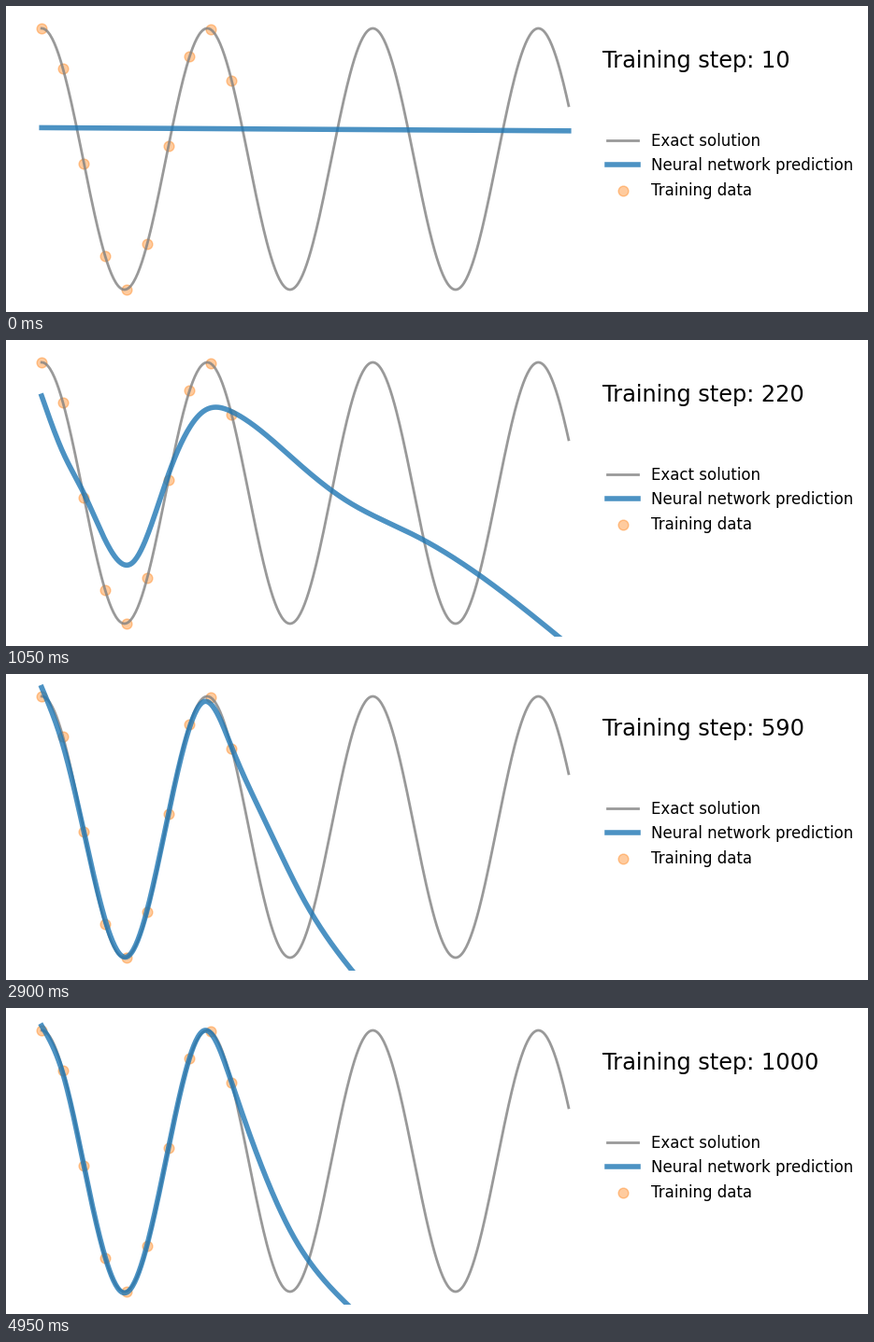
A matplotlib script that plays this animation: 922x328 px, repeating every 5 s.

```python
import numpy as np
import matplotlib.pyplot as plt
from matplotlib.animation import FuncAnimation

W, H, DPI = 922, 328, 100
PAD, AX_W, AX_H = 10, 620, 308
FRAMES, INTERVAL = 100, 50

x = np.linspace(0, 1, 500)
x_px = PAD + (x + 0.05) * AX_W / 1.1
exact = np.cos(20 * x)


def ease(step, start, end):
    t = np.clip((step - start) / (end - start), 0, 1)
    return t * t * (3 - 2 * t)


def natural_spline(xk, yk, xs):
    n, h = len(xk), np.diff(xk)
    m, r = np.eye(n), np.zeros(n)
    for i in range(1, n - 1):
        m[i, i - 1:i + 2] = h[i - 1], 2 * (h[i - 1] + h[i]), h[i]
        r[i] = 6 * ((yk[i + 1] - yk[i]) / h[i] - (yk[i] - yk[i - 1]) / h[i - 1])
    c = np.linalg.solve(m, r)
    i = np.clip(np.searchsorted(xk, xs) - 1, 0, n - 2)
    a, b = (xk[i + 1] - xs) / h[i], (xs - xk[i]) / h[i]
    return (a * yk[i] + b * yk[i + 1]
            + ((a ** 3 - a) * c[i] + (b ** 3 - b) * c[i + 1]) * h[i] ** 2 / 6)


def early_curve(step):
    """Nearly flat line that grows into an S-shaped slope (pixels from top)."""
    e = ease(step, 10, 150)
    mid, amp, width = 132 - 44 * e * e, -2.8 + 91.1 * e, 400 - 200 * e
    return mid - amp * np.tanh((x_px - 290) / width)


def fitted_curve(step):
    """Fit through the data whose remaining error decays exponentially."""
    k = np.exp((290 - step) / 280)
    fast = k * k
    knots = np.array([
        (38.2, 20.5 - 17.5 * k),
        (60.8, 68.5 + 21.5 * k),
        (83.4, 169.5),
        (127 + 6 * k, 306 - 8 * k),         # trough
        (173.7, 150.2),
        (212, 22.5 + 20.5 * k),             # peak
        (241.5, 80.5 - 14 * fast),
        (268.5 + 34 * k, 164),              # tail
        (301 + 48 * k, 240),
        (365 + 45 * fast, 318),
        (602, 520),
    ])
    return natural_spline(*knots.T, x_px)


def prediction(step):
    mix = ease(step, 150, 270)
    y_px = (1 - mix) * early_curve(step) + mix * fitted_curve(step)
    return (H / 2 - y_px) * 2.2 / AX_H


fig = plt.figure(figsize=(W / DPI, H / DPI), dpi=DPI, facecolor="white")
ax = fig.add_axes([PAD / W, PAD / H, AX_W / W, AX_H / H])
ax.set(xlim=(-0.05, 1.05), ylim=(-1.1, 1.1))
ax.axis("off")

ax.plot(x, exact, color="grey", lw=2, alpha=0.8, label="Exact solution")
fit, = ax.plot(x, prediction(10), color="tab:blue", lw=4, alpha=0.8,
               label="Neural network prediction")
ax.scatter(x[:200:20], exact[:200:20], s=60, color="tab:orange", alpha=0.4,
           label="Training data")
ax.legend(loc=(1.01, 0.34), frameon=False, fontsize="large")
title = ax.text(1.065, 0.7, "", fontsize="xx-large", color="k")


def draw(frame):
    step = 10 * (frame + 1)
    fit.set_ydata(prediction(step))
    title.set_text(f"Training step: {step}")
    return fit, title


anim = FuncAnimation(fig, draw, frames=FRAMES, interval=INTERVAL, repeat=True)
plt.show()
```
